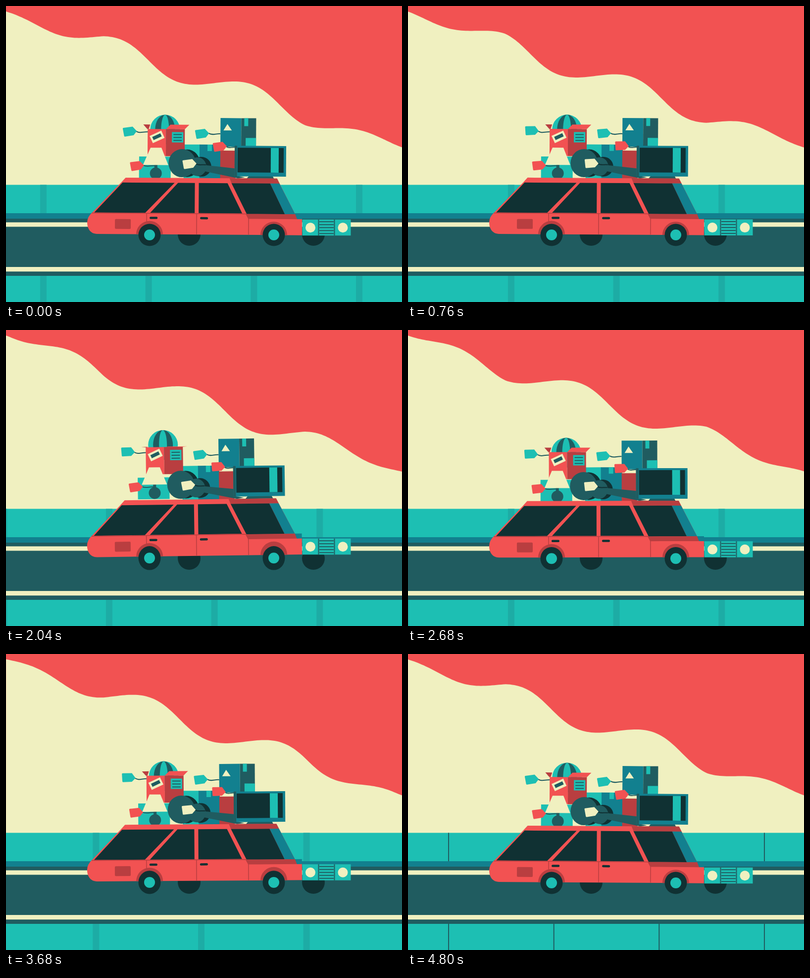
Recreate the animation shown at these times as an HTML page. Size 800 by 600 pixels, loop 4.84 s.

```html
<!DOCTYPE html>
<html lang="en">
<head>
<meta charset="utf-8">
<title>Road trip</title>
<style>
  html, body { margin: 0; width: 100%; height: 100%; overflow: hidden; }
  svg { display: block; width: 800px; height: 600px; }
  .red { fill: #f25252; }
  .maroon { fill: #b93e40; }
  .cream { fill: #f0f0c0; }
  .teal { fill: #1dbfb3; }
  .blue { fill: #12808f; }
  .slate { fill: #205c60; }
  .ink { fill: #103133; }
  .line { fill: none; stroke: #205c60; stroke-width: 2; }
  .seam { fill: none; stroke: #b93e40; stroke-width: 1.5; }
</style>
</head>
<body>
<svg viewBox="0 0 800 600">
  <defs>
    <path id="label" d="M-28 -6.500q-.2-1.500 1.500-1.700L-8 -9.500 0 0-7 8-24.500 9.800q-1.500 0-1.700-1.500z"/>
  </defs>

  <rect class="red" width="800" height="600"/>
  <path class="cream" id="hill"/>
  <path class="teal" d="M0 362.600H800V420H0zM0 547H800V600H0z"/>
  <path class="blue" d="M0 420H800V431H0z"/>
  <path class="slate" d="M0 431H800V547H0z"/>
  <path class="cream" d="M0 438.400H800V447.500H0zM0 529H800V538.300H0z"/>
  <path id="panels" fill="none"/>

  <g class="ink">
    <circle cx="370" cy="463" r="23"/>
    <circle cx="621" cy="463" r="23"/>
  </g>

  <g id="car">
    <!-- luggage -->
    <path class="teal" data-float="2.5" d="M268 304H332V348H268z"/>
    <path class="teal" d="M358 279H391V348H358z"/>
    <path class="blue" d="M390 279H433V348H390z"/>
    <path class="teal" d="M406 279H415V292H406z"/>
    <path class="maroon" d="M432 291H463V348H432z"/>

    <path class="blue" d="M432 225H474V283H432z"/>
    <path class="slate" d="M474 225H504V283H474z"/>
    <path class="teal" d="M480 225H488V241H480zM483 265H504V283H483z"/>
    <path class="cream" d="M446 237L455 250H438z"/>
    <path class="line" d="M408 256c9 5 14 0 24 1"/>
    <g transform="translate(409 256)"><use href="#label" class="teal" data-swing="24 0"/></g>

    <g data-float="13.3">
      <circle class="teal" cx="320" cy="249" r="30"/>
      <ellipse class="slate" cx="320" cy="249" rx="20" ry="30"/>
      <ellipse class="teal" cx="320" cy="249" rx="8" ry="30"/>
    </g>
    <g data-float="3">
      <path class="line" d="M262 253c9 5 12 0 28 1"/>
      <g transform="translate(263 252.500)"><use href="#label" class="teal" data-swing="8 0"/></g>
    </g>
    <g data-float="8">
      <path class="red" d="M285 248H322V303H285z"/>
      <path class="maroon" d="M322 248H360V303H322z"/>
      <g transform="translate(0 248)">
        <g id="flaps">
          <path class="maroon" d="M276 -9H290L287 0H284z"/>
          <path class="red" d="M331 -9H369L360 0H322z"/>
        </g>
      </g>
      <g transform="rotate(-25 304 264)">
        <path class="cream" d="M291 256H317V272H291z"/>
        <path class="slate" d="M295 260H313V267H295z"/>
      </g>
      <path class="teal" d="M334 254H357V275H334z"/>
      <path class="line" d="M337 259H354M337 265H354M337 271H354"/>
    </g>

    <g data-float="5">
      <path class="slate" d="M299 320H305V330H299z"/>
      <circle class="slate" cx="302" cy="338" r="12"/>
      <path class="cream" d="M291 286H313L327 321H276z"/>
    </g>
    <g data-float="2">
      <path class="line" d="M277 322c9 4 14-1 26 1"/>
      <g transform="translate(278 322)"><use href="#label" class="red" data-swing="24 0"/></g>
    </g>

    <g class="ink">
      <ellipse cx="365" cy="317" rx="26" ry="28"/>
      <circle cx="394" cy="324" r="20"/>
    </g>
    <g class="slate">
      <ellipse cx="355" cy="317" rx="27.500" ry="28.500"/>
      <ellipse cx="386" cy="324" rx="18" ry="19"/>
      <path d="M385 319L462 327V341L482 345 468 347 400 333z"/>
    </g>
    <path class="line" style="stroke:#103133" d="M383 318c6 4 12 1 20 2"/>
    <g transform="translate(384 317.500)"><use href="#label" class="cream" data-swing="24 -.4"/></g>

    <g data-float=".6">
      <path class="slate" d="M490 342H538L541 348H485z"/>
      <path class="blue" d="M461 281H565V343H461z"/>
      <path class="slate" d="M461 281H466V343H461z"/>
      <path class="ink" d="M467 285H560V335H467z"/>
      <path class="teal" d="M534 285H550V335H534z"/>
    </g>
    <path class="line" d="M444 283c7 4 10 0 18 1"/>
    <g transform="translate(445 282)"><use href="#label" class="red" data-swing="8 0"/></g>

    <!-- body -->
    <path class="red" d="M241 347H547L584 419 598 429V461.500H184C170 461.500 164 450 164 438Q164 427 174 418L232 357z"/>
    <path class="maroon" d="M451 347H547L552 357H455zM484 419H585L590 429H490z"/>
    <path class="blue" d="M533 357H552L584 419H563z"/>
    <path class="ink" d="M235 357H340L281 418H178zM347 357H381V418H291zM389 357H447L477 418H389zM455 357H533L563 419H486z"/>
    <path class="blue" d="M584 419H598V429H588z"/>
    <path class="seam" d="M173 419H485L490 429V461M284 419V437M385 419V461"/>
    <path class="maroon" d="M263 461.500a27 27 0 0 1 54 0zM514 461.500a27 27 0 0 1 54 0z"/>
    <rect class="maroon" x="220" y="431" width="32" height="20" rx="2"/>
    <g class="ink">
      <rect x="290" y="426" width="16" height="4.500" rx="2"/>
      <rect x="392" y="426" width="16" height="4.500" rx="2"/>
    </g>
  </g>

  <g id="grille">
    <path class="teal" d="M598.500 429.500H696.500V462H598.500z"/>
    <path class="line" d="M631.500 429.500V462M663.500 429.500V462M633 434H662M633 440H662M633 446H662M633 452H662M633 458H662"/>
    <circle class="cream" cx="615" cy="446" r="10"/>
    <circle class="cream" cx="680.500" cy="446" r="10"/>
  </g>

  <g id="wheels">
    <ellipse class="ink" cx="290" rx="22.500"/>
    <ellipse class="ink" cx="541" rx="22.500"/>
    <circle class="teal" cx="290" r="11"/>
    <circle class="teal" cx="541" r="11"/>
  </g>
</svg>

<script>
const FRAME = 40, CYCLE = 120, BUMP = 20, TAU = 2 * Math.PI;
const byId = id => document.getElementById(id);
const set = (el, name, value) => el.setAttribute(name, value);
const [hill, panels, car, grille, flaps] =
  ['hill', 'panels', 'car', 'grille', 'flaps'].map(byId);
const floating = document.querySelectorAll('[data-float]');
const swinging = document.querySelectorAll('[data-swing]');
const wheelParts = document.querySelectorAll('#wheels > *');

// A sine wave travelling down a slope, pinned at both stage edges.
function drawHill(n) {
  const wavelength = 800 / 3, amplitude = 22;
  let d = 'M0 600';
  for (let x = 0; x <= 800; x += 4) {
    const wave = amplitude * Math.sin(TAU * ((x - 288) / wavelength + n / CYCLE));
    const out = x - 0.325 * wave;
    const pin = Math.max(0, Math.min(1, out / 197, (800 - out) / 197));
    const shift = wave * pin;
    d += `L${(x - 0.325 * shift).toFixed(2)} ${(11.3 + 0.344 * x + 0.946 * shift).toFixed(2)}`;
  }
  set(hill, 'd', d + 'L800 600z');
}

// Wall joints smear while moving and turn sharp when the drive ends.
function drawPanels(n) {
  const gap = 638 / 3, still = n === CYCLE;
  const first = (still ? 82 : 75.5) - (n % 8) * gap / 8;
  let d = '';
  for (let i = 0; i < 6; i++) {
    const x = first + i * gap;
    d += `M${x} 362.6V420M${x} 547V600`;
  }
  set(panels, 'd', d);
  set(panels, 'stroke', still ? '#205c60' : '#1daca5');
  set(panels, 'stroke-width', still ? 2 : 13);
}

// The nose lifts on each bump; every third one also throws the luggage.
function drawCar(n) {
  const big = Math.floor(n / BUMP) % 3 === 2;
  const phase = ((n % BUMP) / BUMP) ** 1.15;
  const bounce = Math.sin(Math.PI * phase) ** 2;
  const lift = bounce * (big ? 10 : 6.8);
  const hop = big ? bounce : 0;
  const sag = 3.3 - lift;

  set(car, 'transform', `translate(0 ${sag * 0.15}) rotate(${sag / 510 * 360 / TAU} 182 450)`);
  set(grille, 'transform', `translate(0 ${sag})`);
  set(flaps, 'transform', `scale(1 ${1 - 0.9 * hop})`);
  for (const el of floating) set(el, 'transform', `translate(0 ${-el.dataset.float * hop})`);
  for (const el of swinging) {
    const [period, offset] = el.dataset.swing.split(' ').map(Number);
    set(el, 'transform', `rotate(${-4 * Math.cos(TAU * n / period + offset)})`);
  }
  const hub = 464 - lift * 0.17;
  for (const el of wheelParts) {
    set(el, 'cy', hub);
    if (el.tagName === 'ellipse') set(el, 'ry', 486.5 - hub);
  }
}

const start = performance.now();
function draw() {
  const n = Math.floor((performance.now() - start) / FRAME) % (CYCLE + 1);
  drawHill(n);
  drawPanels(n);
  drawCar(n);
  requestAnimationFrame(draw);
}
draw();
</script>
</body>
</html>
```
